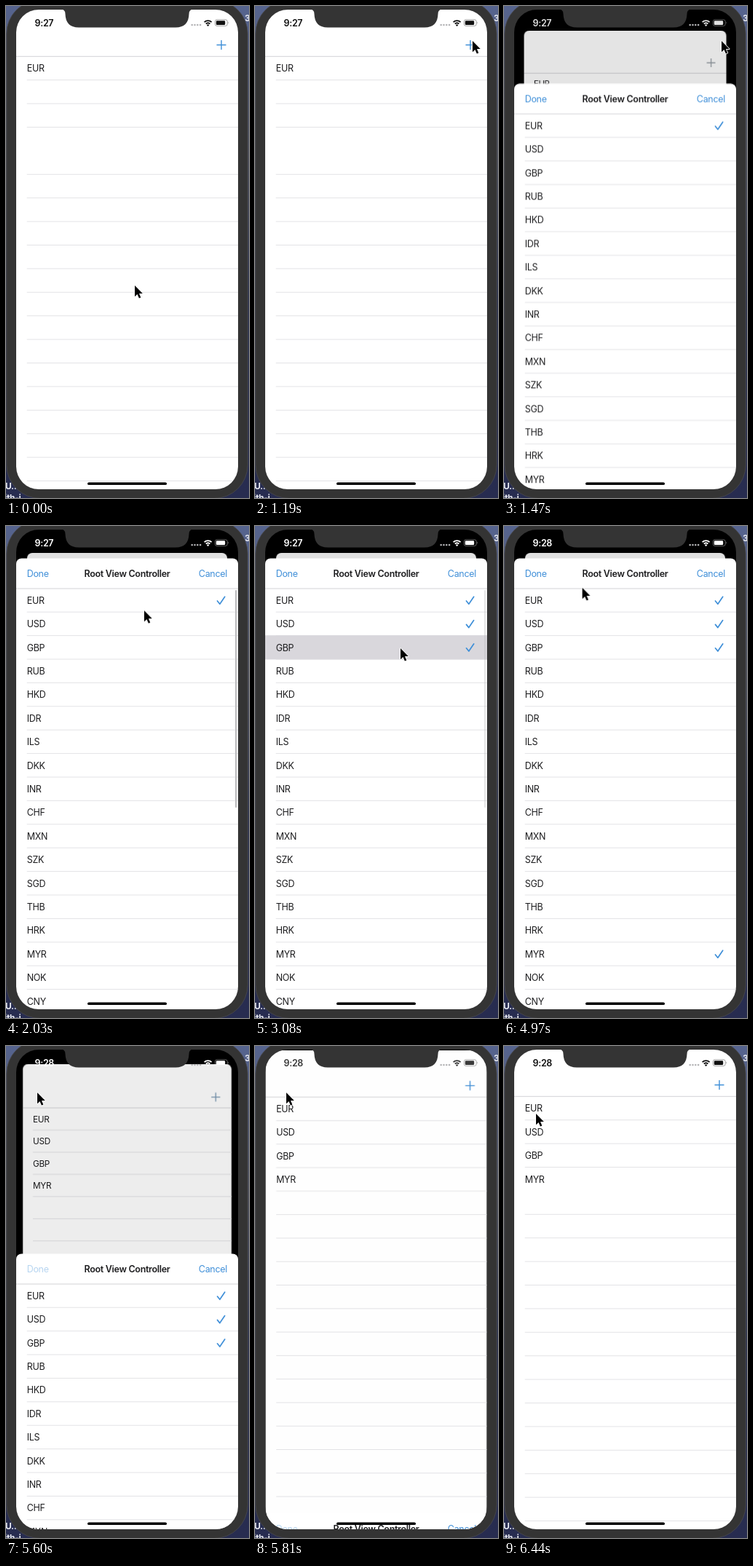
Recreate the animation shown at these times as an HTML page. Size 334 by 676 pixels, loop 6.51 s.

```html
<!DOCTYPE html>
<html lang="en">
<head>
<meta charset="utf-8">
<title>Currency picker</title>
<style>
  :root {
    --loop: 6510ms;
    --blue: #3f8fd8;
    /* critically damped spring */
    --spring: linear(0, .09, .264, .442, .594, .713, .801, .864, .908, .939,
      .96 55.6%, .983 66.7%, .993 77.8%, 1);
  }
  html, body { margin: 0; width: 100%; height: 100%; overflow: hidden; background: #2a2f4c; }
  svg { display: block; width: 334px; height: 676px; }
  text { font: 400 12.5px Inter, Roboto, sans-serif; letter-spacing: -.024em; fill: #1d1d1f; }
  .bold { font-weight: 600; }
  .link { fill: var(--blue); }
  .desk { font-weight: 700; font-size: 12px; fill: #e8eaf2; }
  .line { stroke: #e3e3e6; stroke-width: 1; }
  .bar { stroke: #d3d3d6; stroke-width: 1; }
  .tick { fill: none; stroke: var(--blue); stroke-width: 1.7; stroke-linecap: round; stroke-linejoin: round; }

  #back { transform-origin: 166.5px 5px; animation: recede var(--loop) var(--spring) infinite; }
  #dim { animation: dim var(--loop) var(--spring) infinite; }
  #plus { fill: none; stroke-width: 1.4; animation: plus var(--loop) var(--spring) infinite; }
  #sheet { animation: slide var(--loop) var(--spring) infinite; }
  #status { animation: status var(--loop) ease-out infinite; }
  #status text { fill: currentColor; }
  #cursor { animation: cursor var(--loop) linear infinite; }
  #thumb { animation: thumb var(--loop) linear infinite; }
  #added, #fourth, #done, #before, #after, .picked { animation: added var(--loop) step-end infinite; }
  #fourth { animation-name: fourth; }
  #done { animation-name: done; }
  #before { animation-name: before; }
  #after { animation-name: after; }
  .usd { animation-name: usd; }
  .gbp { animation-name: gbp; }
  .myr { animation-name: myr; }
  .tap { fill: #d9d7dc; animation: tap var(--loop) linear calc(var(--at) - var(--loop)) infinite; }

  @keyframes recede {
    0%, 19.31%, 92.47%, 100% { transform: none; }
    26.88%, 84.9% { transform: translateY(32px) scale(.902); }
  }
  @keyframes dim {
    0%, 19.31%, 92.47%, 100% { opacity: 0; }
    26.88%, 84.9% { opacity: .12; }
  }
  @keyframes plus {
    0%, 19.31%, 92.47%, 100% { stroke: #3f8fd8; }
    26.88%, 84.9% { stroke: #989898; }
  }
  @keyframes slide {
    0%, 19.31%, 92.47%, 100% { transform: translateY(620px); }
    26.88%, 84.9% { transform: none; }
  }
  @keyframes status {
    0%, 19.31%, 91%, 100% { color: #111; }
    24%, 86.1% { color: #fff; }
  }
  @keyframes tap {
    0%, 2.1% { opacity: 1; }
    7.3%, 100% { opacity: 0; }
  }
  @keyframes thumb {
    0%, 27.9% { opacity: 0; }
    29.1%, 45.6% { opacity: 1; }
    48.4%, 100% { opacity: 0; }
  }
  @keyframes added { 0% { opacity: 0; } 84.9%, 100% { opacity: 1; } }
  @keyframes fourth { 0% { opacity: 0; } 84.9% { opacity: 1; } 92.47%, 100% { opacity: 0; } }
  @keyframes done { 0% { opacity: 1; } 84.9%, 100% { opacity: .38; } }
  @keyframes before { 0% { opacity: 1; } 68.8%, 100% { opacity: 0; } }
  @keyframes after { 0% { opacity: 0; } 68.8%, 100% { opacity: 1; } }
  @keyframes usd { 0% { opacity: 0; } 37.6%, 100% { opacity: 1; } }
  @keyframes gbp { 0% { opacity: 0; } 47%, 100% { opacity: 1; } }
  @keyframes myr { 0% { opacity: 0; } 65.2%, 100% { opacity: 1; } }
  @keyframes cursor {
    0% { transform: translate(177px, 384px); animation-timing-function: ease-in-out; }
    11.83%, 23.66% { transform: translate(299px, 48px); }
    23.66% { animation-timing-function: ease-in; }
    27.96% { transform: translate(262px, 84px); }
    31.18% { transform: translate(190px, 116px); animation-timing-function: ease-out; }
    33.33%, 38.7% { transform: translate(184px, 127px); animation-timing-function: ease-in-out; }
    44.1%, 49.5% { transform: translate(200px, 168px); animation-timing-function: ease-in; }
    55.9% { transform: translate(149px, 555px); animation-timing-function: ease-out; }
    59.14%, 66.7% { transform: translate(137px, 582px); animation-timing-function: ease-in; }
    73.1% { transform: translate(235px, 145px); }
    76.34% { transform: translate(108px, 85px); animation-timing-function: ease-out; }
    81.72%, 95.7% { transform: translate(43px, 64px); animation-timing-function: ease-in-out; }
    98.92%, 100% { transform: translate(44px, 93px); }
  }
</style>
</head>
<body>
<svg viewBox="0 0 334 676">
  <defs>
    <linearGradient id="night" x2="0" y2="1">
      <stop offset="0" stop-color="#56648f"/>
      <stop offset=".3" stop-color="#50535f"/>
      <stop offset=".6" stop-color="#2c3350"/>
      <stop offset="1" stop-color="#272c50"/>
    </linearGradient>
    <clipPath id="screen"><rect x="14" y="5" width="305" height="659" rx="31"/></clipPath>
  </defs>

  <rect width="334" height="676" fill="url(#night)"/>
  <text class="desk" x="328" y="21">3</text>
  <text class="desk" x="-1" y="664">U..</text>
  <text class="desk" x="-2" y="680">ith-i</text>
  <rect x=".8" y="-8" width="331.4" height="684.5" rx="46" fill="#343434" stroke="#4a4a4d" stroke-width=".8"/>

  <g clip-path="url(#screen)">
    <rect x="14" y="5" width="305" height="659"/>
    <g id="back">
      <rect x="14" y="5" width="305" height="680" rx="8" fill="#fff"/>
      <path class="bar" d="M14 69.3H319"/>
      <path id="plus" d="M289.5 53.5H302.5M296 47V60"/>
      <g id="list"></g>
      <rect id="dim" x="14" y="5" width="305" height="680" rx="8"/>
    </g>

    <g id="status" fill="currentColor">
      <text id="before" class="bold" x="39.5" y="27.5">9:27</text>
      <text id="after" class="bold" x="39.5" y="27.5">9:28</text>
      <path d="M255.7 26h13" fill="none" stroke="#b4b4b6" stroke-width="2.6" stroke-linecap="round" stroke-dasharray="0 3.8"/>
      <g fill="none" stroke="currentColor" stroke-width="1.8">
        <path d="M272.6 22.2a7.2 7.2 0 0 1 10 0"/>
        <path d="M274.8 24.5a4.1 4.1 0 0 1 5.6 0"/>
      </g>
      <path d="M277.6 28l-1.7-1.8a2.4 2.4 0 0 1 3.4 0z"/>
      <rect x="287.4" y="18.8" width="16.8" height="8.6" rx="2.4" fill="none" stroke="currentColor" stroke-opacity=".42" stroke-width=".9"/>
      <rect x="288.8" y="20.2" width="12.4" height="5.8" rx="1.3"/>
      <path d="M305.2 21.6q1.4 1.5 0 3z" opacity=".5"/>
    </g>

    <g id="sheet">
      <rect x="14" y="44.4" width="305" height="640" rx="7.4" fill="#fff"/>
      <g id="rows"></g>
      <path class="bar" d="M14 86H319"/>
      <text id="done" class="link" x="28.7" y="70">Done</text>
      <text class="bold" x="166.5" y="70" text-anchor="middle">Root View Controller</text>
      <text class="link" x="304" y="70" text-anchor="end">Cancel</text>
      <rect id="thumb" x="315" y="88" width="2.2" height="299" rx="1.1" fill="#bcbcbe"/>
    </g>

    <rect x="112" y="654.4" width="109" height="3.7" rx="1.85"/>
  </g>

  <path d="M76 4.5Q81.5 5 81.5 11Q82 29.5 100 29.5H233Q251 29.5 251.5 11Q251.5 5 257 4.5Z" fill="#343434"/>

  <g id="cursor">
    <path d="M0 0V15.2L3.5 12L5.9 17.4L8.3 16.4L6 11.1H10.8Z" stroke="#fff" stroke-width="1.6" stroke-linejoin="round" paint-order="stroke"/>
  </g>
</svg>
<script>
  const PITCH = 32.4, LIST_TOP = 69.3, ROWS_TOP = 85.8;
  const codes = 'EUR USD GBP RUB HKD IDR ILS DKK INR CHF MXN SZK SGD THB HRK MYR NOK CNY'.split(' ');
  const taps = { USD: 2310, GBP: 2990, MYR: 4130 };
  const fill = (id, html) => document.getElementById(id).innerHTML = html;

  const line = (y, id = '') => `<path class="line" ${id} d="M28.7 ${y}H319"/>`;
  const label = (code, top) => `<text x="28.7" y="${top + 21}">${code}</text>`;

  // main list: one saved currency, the rest added on Done
  let list = '';
  for (let n = 1; n <= 18; n++) list += line(LIST_TOP + PITCH * n, n === 4 ? 'id="fourth"' : '');
  const added = Object.keys(taps).map((code, i) => label(code, LIST_TOP + PITCH * (i + 1)));
  fill('list', list + label('EUR', LIST_TOP) + `<g id="added">${added.join('')}</g>`);

  // picker rows
  fill('rows', codes.map((code, i) => {
    const top = ROWS_TOP + PITCH * i;
    const tapped = code in taps;
    let row = line(top + PITCH);
    if (tapped) row += `<rect class="tap" style="--at:${taps[code]}ms" x="14" y="${top - .4}" width="305" height="${PITCH + .8}"/>`;
    row += label(code, top);
    if (tapped || i === 0) {
      const cls = tapped ? `picked ${code.toLowerCase()}` : '';
      row += `<path class="tick ${cls}" d="M290.5 ${top + 17.2}l3.4 4.2l6.8 -10"/>`;
    }
    return row;
  }).join(''));
</script>
</body>
</html>
```
